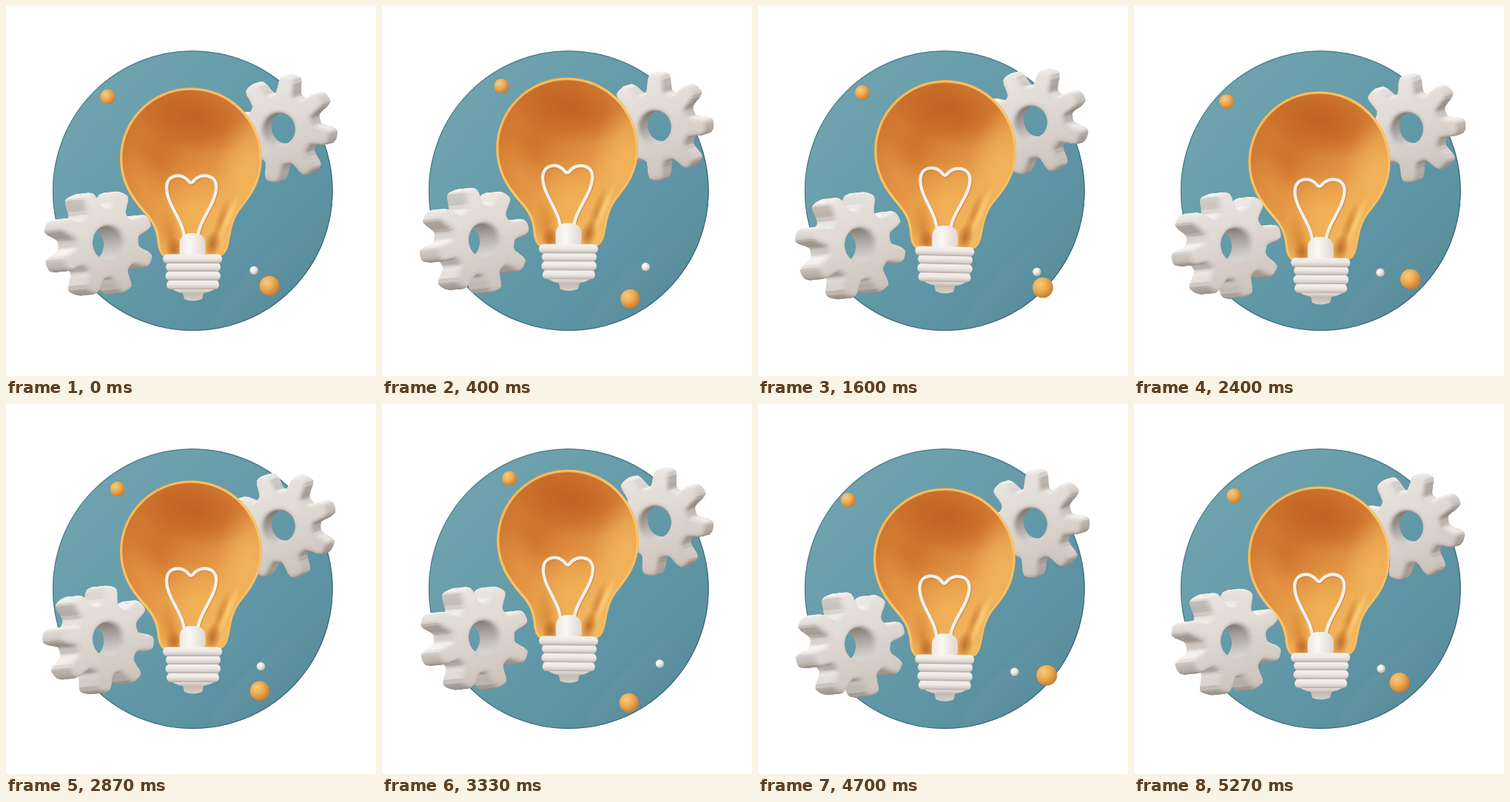
An HTML page with a canvas that plays this animation: 500 px wide and 500 px high, repeating every 5.31 s.

```html
<!DOCTYPE html>
<html lang="en">
<head>
<meta charset="utf-8">
<title>Bulb and gears</title>
<style>
  html, body { margin: 0; width: 100%; height: 100%; overflow: hidden; background: #fff; }
  canvas { display: block; width: 500px; height: 500px; }
</style>
</head>
<body>
<canvas id="stage"></canvas>
<script>
const canvas = document.getElementById('stage');
const ctx = canvas.getContext('2d');
const dpr = window.devicePixelRatio || 1;
canvas.width = canvas.height = 500 * dpr;

const TURN = 2655; // one cycle; the 5310 ms loop holds two
const TAU = Math.PI * 2;

// Cosine swing: middle, amplitude, time of the peak in seconds
const swing = (t, mid, amp, peak) => mid + amp * Math.cos(TAU * (t - peak * 1000) / TURN);

const mix = (a, b, k) => a.map((v, i) => v + (b[i] - v) * k);
const rgb = c => `rgb(${c.map(Math.round).join(',')})`;

function fade(g, stops) {
  stops.forEach(([at, color]) => g.addColorStop(at, color));
  return g;
}
const linear = (x0, y0, x1, y1, stops) => fade(ctx.createLinearGradient(x0, y0, x1, y1), stops);
const radial = (x, y, r, stops) => fade(ctx.createRadialGradient(x, y, 0, x, y, r), stops);

// Soft elliptical glow, painted inside the current clip
function glow(x, y, rx, ry, angle, color, alpha) {
  ctx.save();
  ctx.translate(x, y);
  ctx.rotate(angle);
  ctx.scale(rx, ry);
  ctx.fillStyle = radial(0, 0, 1, [[0, `rgba(${color},${alpha})`],
    [0.5, `rgba(${color},${alpha * 0.55})`], [1, `rgba(${color},0)`]]);
  ctx.fillRect(-1, -1, 2, 2);
  ctx.restore();
}

// ---------- disc ----------
function disc() {
  ctx.save();
  ctx.beginPath();
  ctx.arc(252.3, 249.7, 189.3, 0, TAU);
  ctx.fillStyle = linear(100, 110, 400, 400, [[0, '#70a3af'], [0.5, '#639aa8'], [1, '#578c9c']]);
  ctx.fill();
  ctx.clip();
  ctx.beginPath();
  ctx.moveTo(445, 262);
  ctx.bezierCurveTo(400, 312, 310, 350, 268, 445);
  ctx.lineTo(450, 445);
  ctx.closePath();
  ctx.fillStyle = linear(330, 350, 400, 410, [[0, 'rgba(112,152,160,.35)'], [1, 'rgba(82,136,152,.1)']]);
  ctx.fill();
  ctx.restore();
  ctx.beginPath();
  ctx.arc(252.3, 249.7, 188.8, 0, TAU);
  ctx.strokeStyle = linear(120, 120, 390, 390, [[0, '#4f7f8b'], [1, '#356778']]);
  ctx.lineWidth = 1.2;
  ctx.stroke();
}

// ---------- gears ----------
const DARK = [146, 136, 128], LIGHT = [248, 245, 242], FACE = [221, 214, 208];
const BEVEL = 6;

// Rows from back to front: depth, inset, how far the surface faces the viewer
const rows = [];
for (const k of [0, 1, 2]) {
  const a = k * Math.PI / 4;
  rows.push([1 - 0.25 * (1 - Math.cos(a)), BEVEL * (1 - Math.sin(a)), 0]);
}
for (let k = 5; k >= 0; k--) {
  const a = k * Math.PI / 10;
  rows.push([0.25 * (1 - Math.cos(a)), BEVEL * (1 - Math.sin(a)), Math.cos(a)]);
}

const toothRadius = a => 60 + 12 * Math.tanh(2.3 * Math.cos(8 * a)) / Math.tanh(2.3);

// Unit outline points (angle clockwise from the top) with normals
function ring(count, radius, phase, sign) {
  const list = [];
  for (let i = 0; i < count; i++) {
    const a = TAU * i / count, r = radius(a), b = a + phase;
    const slope = (radius(a + 0.01) - radius(a - 0.01)) / 0.02;
    const s = Math.sin(b), c = Math.cos(b);
    const nx = r * s - slope * c, ny = -r * c - slope * s;
    const len = Math.hypot(nx, ny) * sign;
    list.push({ x: r * s, y: -r * c, nx: nx / len, ny: ny / len });
  }
  return list;
}

function gear(cx, cy, phase, squash, dx, dy) {
  const outer = ring(144, toothRadius, phase, 1);
  const hole = ring(48, () => 22, 0, -1);
  const place = (p, [z, inset]) => [
    cx + dx * (z - 0.5) + (p.x - p.nx * inset) * squash,
    cy + dy * (z - 0.5) + p.y - p.ny * inset];

  const faceTone = (x, y) => {
    const k = ((x - cx) * 0.35 + (y - cy)) / 75;
    return mix(FACE, k < 0 ? [234, 229, 225] : [203, 194, 187], Math.min(1, Math.abs(k)));
  };

  ctx.lineWidth = 0.8;
  ctx.lineJoin = 'round';
  for (let r = 0; r < rows.length - 1; r++) {
    const back = rows[r], front = rows[r + 1];
    const facing = (back[2] + front[2]) / 2;
    for (const [shape, dim] of [[outer, 1], [hole, 0.88]]) {
      for (let i = 0; i < shape.length; i++) {
        const p = shape[i], q = shape[(i + 1) % shape.length];
        const pts = [place(p, back), place(q, back), place(q, front), place(p, front)];
        const lit = 0.5 + 0.5 * (-0.32 * p.nx - 0.92 * p.ny);
        const side = mix(DARK, LIGHT, lit).map(v => v * dim);
        const color = rgb(mix(side, faceTone(...pts[0]), facing * facing));
        ctx.beginPath();
        pts.forEach(pt => ctx.lineTo(...pt));
        ctx.closePath();
        ctx.fillStyle = ctx.strokeStyle = color;
        ctx.fill();
        ctx.stroke();
      }
    }
  }

  const top = rows[rows.length - 1];
  ctx.beginPath();
  for (const shape of [outer, hole]) {
    shape.forEach((p, i) => ctx[i ? 'lineTo' : 'moveTo'](...place(p, top)));
    ctx.closePath();
  }
  ctx.fillStyle = linear(cx - 23, cy - 67, cx + 23, cy + 67,
    [[0, 'rgb(234,229,225)'], [0.5, rgb(FACE)], [1, 'rgb(203,194,187)']]);
  ctx.fill('evenodd');
}

// ---------- bulb ----------
const glass = new Path2D('M250 112 C302 112 344 154 344 206 C344 237 330 256 316 273 ' +
  'C304 289 303 303 300 318 Q297 336 287 337 L214 337 Q207 333 206 317 ' +
  'C204 302 200 292 187 278 C171 260 155.5 238 155.5 206 C155.5 154 198 112 250 112Z');
const heart = new Path2D('M241 314 C240 289 216 268 217 244 C218 227 238 225 247 237 ' +
  'Q250 241 253 237 C262 225 284 227 284 244 C284 268 260 289 259 314');
const tip = new Path2D('M218 376 L288 376 Q281 386 267 388 L265 396 Q253 401 241 396 L239 388 Q225 386 218 376Z');

function pill(x0, x1, y, h, r) {
  ctx.beginPath();
  ctx.roundRect(x0, y, x1 - x0, h, r);
  ctx.fill();
}

function bulb(t) {
  ctx.save();
  ctx.translate(0, swing(t, 100.9, 15.2, 2.28) - 110.5);
  ctx.translate(252, 355);
  ctx.rotate(swing(t, 0.0115, 0.0115, 1.45));
  ctx.translate(-252, -355);

  ctx.save();
  ctx.fillStyle = linear(190, 140, 310, 310,
    [[0, '#cf7630'], [0.35, '#d57e35'], [0.7, '#eaa44d'], [1, '#f3ba62']]);
  ctx.fill(glass);
  ctx.clip(glass);
  glow(252, 150, 82, 48, 0.25, '190,92,32', 0.85);
  glow(212, 190, 30, 80, 0.5, '198,102,38', 0.4);
  glow(325, 215, 42, 75, 0.3, '247,190,100', 0.6);
  glow(187, 245, 34, 60, -0.5, '234,158,72', 0.65);
  glow(255, 275, 55, 55, 0, '246,184,92', 0.6);
  glow(222, 310, 14, 40, -0.2, '205,116,40', 0.55);
  glow(290, 290, 7, 34, 0.35, '196,112,40', 0.55);
  glow(301, 285, 6, 38, 0.4, '255,212,130', 0.75);
  glow(279, 322, 11, 20, 0.2, '168,82,24', 0.7);
  glow(227, 328, 11, 16, 0, '168,82,24', 0.6);
  ctx.restore();

  ctx.lineJoin = 'round';
  ctx.strokeStyle = linear(160, 120, 330, 320, [[0, '#eda748'], [0.5, '#f4bd62'], [1, '#f0b055']]);
  ctx.lineWidth = 3.6;
  ctx.stroke(glass);
  ctx.strokeStyle = 'rgba(255,222,150,.6)';
  ctx.lineWidth = 1;
  ctx.stroke(glass);

  ctx.lineCap = 'round';
  ctx.save();
  ctx.translate(0.8, 1);
  ctx.strokeStyle = 'rgba(190,130,80,.65)';
  ctx.lineWidth = 5;
  ctx.stroke(heart);
  ctx.restore();
  ctx.strokeStyle = '#f7f1ea';
  ctx.lineWidth = 4.2;
  ctx.stroke(heart);

  ctx.fillStyle = linear(234, 0, 270, 0, [[0, '#eee8e2'], [0.4, '#faf7f4'], [1, '#e0d6cd']]);
  pill(234.5, 269.5, 307, 38, 14);

  ctx.fillStyle = linear(0, 376, 0, 399, [[0, '#c5bbb4'], [0.3, '#e4ded9'], [0.55, '#c3b9b2'], [1, '#d8d1cb']]);
  ctx.fill(tip);
  ctx.fillStyle = '#bdb2aa';
  pill(219, 287, 340, 40, 4);
  for (const [x0, x1, y] of [[217, 288, 370.5], [215.5, 290, 358.5], [216, 290, 346.5], [212, 292, 335.5]]) {
    ctx.fillStyle = linear(0, y, 0, y + 12.5,
      [[0, '#f5f2ef'], [0.45, '#ece8e4'], [0.75, '#d8d1cb'], [1, '#b5aaa2']]);
    pill(x0, x1, y, 12.5, 6);
  }
  ctx.restore();
}

// ---------- balls ----------
const ORANGE = ['#f8cc80', '#ecab52', '#c97b30'];
const WHITE = ['#ffffff', '#ece8e4', '#bdb6b0'];

function ball(x, y, r, [hi, base, low]) {
  ctx.beginPath();
  ctx.arc(x, y, r, 0, TAU);
  ctx.fillStyle = radial(x - r * 0.3, y - r * 0.35, r * 1.4, [[0, hi], [0.5, base], [1, low]]);
  ctx.fill();
}

function draw(t) {
  ctx.setTransform(dpr, 0, 0, dpr, 0, 0);
  ctx.fillStyle = '#fff';
  ctx.fillRect(0, 0, 500, 500);
  const spin = TAU * t / TURN;
  const deg = Math.PI / 180;

  disc();
  ball(swing(t, 147.5, 26.5, 0.83), swing(t, 114.8, -16, 0.88), 10, ORANGE);
  gear(375, swing(t, 159.7, 5.6, 2.59), 9 * deg - spin, 0.95, 14, -4);
  bulb(t);
  gear(124.5, swing(t, 321.2, 4.6, 1.99), 20 * deg + spin, 0.88, -30, 3);
  ball(swing(t, 362.4, 30, 1.15), swing(t, 356.5, 5.5, 2.05), 5.7, WHITE);
  ball(swing(t, 362.5, 29.5, 1.9), swing(t, 385.5, 19.5, 0.83), swing(t, 13.5, 0.5, 1.9), ORANGE);
}

const start = performance.now();
function tick(now) {
  draw(Math.max(0, now - start) % (TURN * 2));
  requestAnimationFrame(tick);
}
draw(0);
requestAnimationFrame(tick);
</script>
</body>
</html>
```
